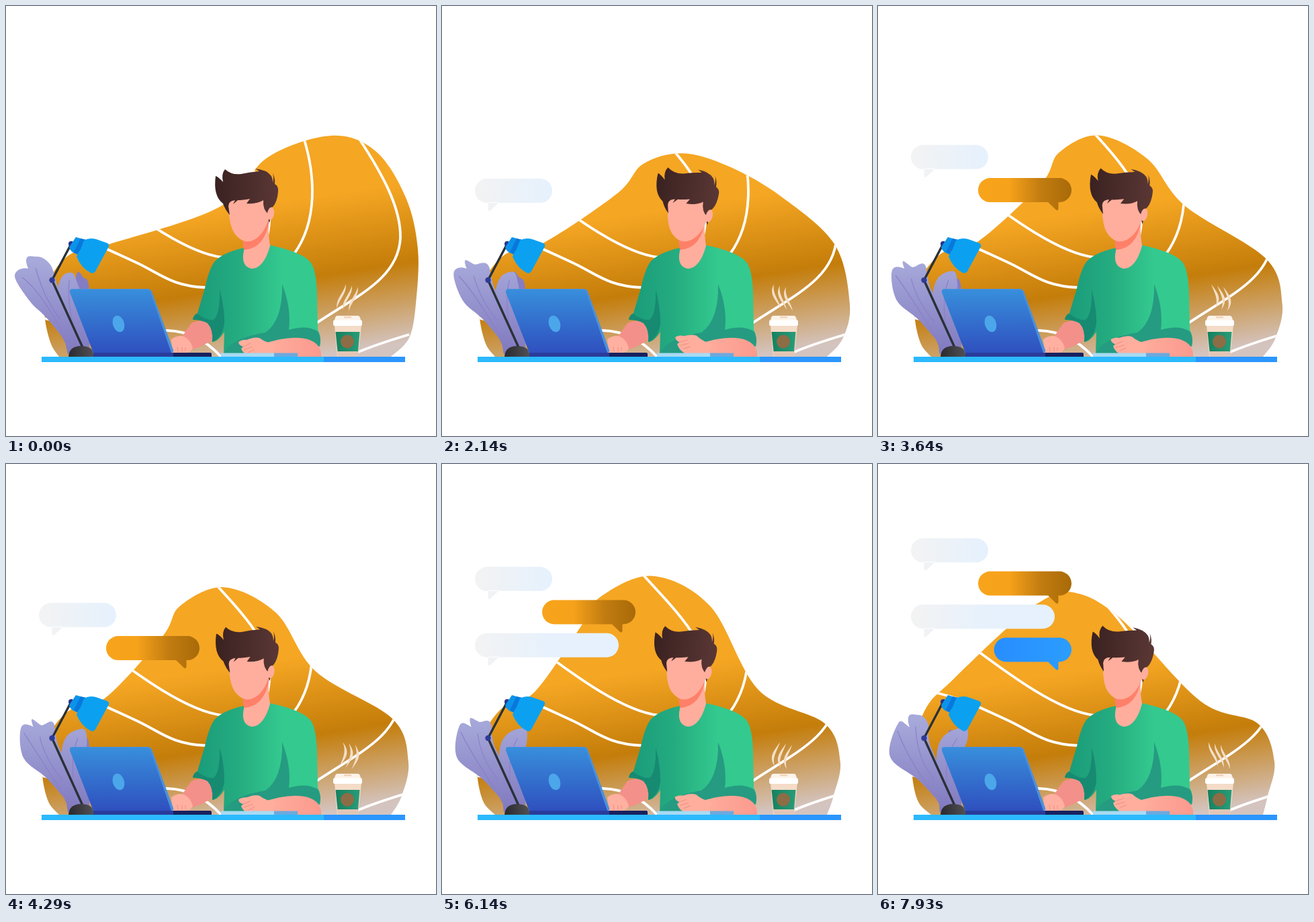
An HTML page with a canvas that plays this animation: 640 by 640 pixels, repeating every 8 s.

```html
<!DOCTYPE html>
<html lang="en">
<head>
<meta charset="utf-8">
<title>At the desk</title>
<style>
html, body { margin: 0; width: 100%; height: 100%; overflow: hidden; background: #fff; }
canvas { display: block; width: 100vw; height: 100vh; }
</style>
</head>
<body>
<canvas id="stage" width="640" height="640"></canvas>
<script>
const ctx = document.getElementById('stage').getContext('2d');
const LOOP = 8000, FPS = 14;

const mix = (a, b, k) => a + (b - a) * k;
const clamp = k => Math.min(1, Math.max(0, k));
const ease = k => { k = clamp(k); return k * k * (3 - 2 * k); };

// Curve through all points, closed by a straight edge
function spline(pts) {
  const path = new Path2D();
  path.moveTo(...pts[0]);
  for (let i = 0; i < pts.length - 1; i++) {
    const a = pts[Math.max(0, i - 1)], b = pts[i], c = pts[i + 1];
    const d = pts[Math.min(pts.length - 1, i + 2)];
    path.bezierCurveTo(b[0] + (c[0] - a[0]) / 6, b[1] + (c[1] - a[1]) / 6,
      c[0] - (d[0] - b[0]) / 6, c[1] - (d[1] - b[1]) / 6, c[0], c[1]);
  }
  path.closePath();
  return path;
}

function gradient(x0, y0, x1, y1, ...colors) {
  const g = ctx.createLinearGradient(x0, y0, x1, y1);
  colors.forEach((c, i) => g.addColorStop(i / (colors.length - 1), c));
  return g;
}

function fill(shape, color) {
  ctx.fillStyle = color;
  ctx.fill(typeof shape === 'string' ? new Path2D(shape) : shape);
}

function stroke(d, color, width) {
  ctx.strokeStyle = color;
  ctx.lineWidth = width;
  ctx.stroke(new Path2D(d));
}

function rect(x, y, w, h, color) {
  ctx.fillStyle = color;
  ctx.fillRect(x, y, w, h);
}

function ellipse(x, y, rx, ry, color, turn = 0) {
  ctx.beginPath();
  ctx.ellipse(x, y, rx, ry, turn, 0, Math.PI * 2);
  ctx.fillStyle = color;
  ctx.fill();
}

function turned(x, y, angle, draw) {
  ctx.save();
  ctx.translate(x, y);
  ctx.rotate(angle);
  ctx.translate(-x, -y);
  draw();
  ctx.restore();
}

// Backdrop: six key points along the crest, left to right, in each pose
const poses = [
  { at: 0, crest: [[318, 299], [390, 225], [484, 193], [550, 216], [595, 285], [613, 362]] },
  { at: 1000, crest: [[290, 280], [345, 246], [420, 222], [500, 237], [560, 273], [598, 352]] },
  { at: 2140, crest: [[258, 279], [295, 234], [352, 219], [420, 239], [500, 285], [583, 355]] },
  { at: 2930, crest: [[248, 268], [275, 221], [330, 197], [400, 230], [455, 292], [578, 374]] },
  { at: 5430, crest: [[210, 240], [236, 196], [317, 163], [405, 209], [470, 334], [570, 386]] },
  { at: 7930, crest: [[190, 246], [240, 206], [290, 191], [360, 229], [480, 353], [565, 386]] }
];
const hillLines = [
  'M443 196C460 250 465 320 428 370',
  'M290 155C330 198 355 225 370 248C390 275 398 310 388 345',
  'M526 198C560 250 588 300 587 345C584 405 525 430 462 472',
  'M600 489C570 498 545 506 522 516',
  'M80 339C130 350 150 362 190 380S245 417 298 419',
  'M140 272C200 317 270 368 322 374',
  'M50 463C110 480 160 482 240 483C275 484 300 500 320 522'
];

function crestAt(t) {
  const next = poses.find(p => p.at > t) || poses[poses.length - 1];
  const from = poses[poses.indexOf(next) - 1];
  const k = clamp((t - from.at) / (next.at - from.at)) ** 1.5;
  return from.crest.map(([x, y], i) => [mix(x, next.crest[i][0], k), mix(y, next.crest[i][1], k)]);
}

function drawHill(t) {
  const p = t / LOOP, left = 58 - 7 * p;
  const foot = [152 - 42 * p ** 4, 355 - 10 * p - 25 * p ** 4];
  const right = 600 + 10 * Math.cos(Math.PI * p);
  const path = spline([[79, 522], [left + 9, 503], [left, 465], [left + 1, 420],
    [foot[0] / 2 + 17, 368 + (foot[1] - 344) * .3], foot, ...crestAt(t),
    [right, 443], [right - 10, 494], [573, 522]]);
  fill(path, gradient(52.4, 345.6, 87.5, 577.7, '#f5a623', '#c47d0a', '#d4c4c0'));
  ctx.save();
  ctx.clip(path);
  hillLines.forEach(d => stroke(d, '#fff', 3.8));
  ctx.restore();
}

function drawPlant(t) {
  const p = t / LOOP, dip = 16 * Math.sin(Math.PI * p), vein = '#8b80c9';
  const lilac = gradient(0, 380, 0, 518, '#a7a9da', '#8079bf');
  fill(spline([[100, 518], [104, 405], [115, 404], [124, 422], [124, 518]]), '#857dc3');
  fill(spline([[90, 505], [32 + 14 * p, 388], [46 + 14 * p, 373 + dip], [66 + 8 * p, 385], [78, 420], [112, 518]]), lilac);
  fill(spline([[104, 518], [62, 466 + 6 * p], [36 - 18 * p, 440 - 4 * p], [13 + 17 * p, 402 - 16 * p],
    [34 + 12 * p, 391], [78, 420], [112, 518]]), lilac);
  stroke(`M100 515Q${54 - 8 * p} ${425 + 20 * p} ${24 + 5 * p} ${404 - 7 * p}`, vein, 1.3);
  stroke(`M84 470Q58 440 ${44 + 12 * p} ${390 + dip}`, vein, 1.2);
  fill(spline([[92, 518], [77 + 10 * p, 440], [82 + 16 * p, 405], [98 + 32 * p, 397 - 5 * p],
    [106 + 27 * p, 412], [118, 450], [124, 518]]), lilac);
  stroke(`M110 515Q90 450 ${94 + 24 * p} 408`, vein, 1.3);
}

function drawLamp() {
  ctx.lineJoin = 'round';
  stroke('M114 508L68.500 408L97 354', '#2a3138', 3.4);
  fill('M93 522Q94 507 110 506Q129 506 130 517V522Z', gradient(93, 0, 130, 0, '#2a2a2e', '#505055'));
  ellipse(68.5, 408, 4.2, 4.2, '#2f3b94');
  ellipse(97, 354, 4, 4, '#26368c');
  fill('M104 344L118 348L107 370Q96 367 94 359Z', '#0b93ea');
  fill('M111 346L120 348L109 371L101 366Z', '#0878dc');
  fill('M116 349Q124 344 134 347L151 353Q154 355 153 358L133 395Q130 399 126 397Q112 390 105 373Q107 367 111 362Z', '#0ba1f0');
}

// Man
const SKIN = '#ffae9d';

function drawBody() {
  fill('M276 472Q290 465 302 472Q311 484 306 497Q300 503 278 511L262 492Z', '#f4908a');
  fill('M354 360Q322 367 310 381Q302 392 296 420L285 457Q279 460 278 467Q291 467 300 472Q309 482 307 500Q315 500 325 485L324 517H440L467 506Q469 490 464 482L463 430Q462 392 453 381Q440 366 393 356Z',
    gradient(285, 0, 410, 0, '#1a9c7a', '#25ac80', '#34c98f'));
  fill('M318 422Q325 448 325 472Q322 494 307 500Q309 482 300 472Q291 467 278 467Q279 460 284 458Q300 469 309 467Q319 458 318 422Z', '#178a72');
  fill('M411 414Q412 468 386 486Q335 494 324 517H385Q420 485 467 507Q470 492 464 484Q447 474 421 482Q425 450 411 414Z', '#259b81');
  fill('M355 340L354 364Q349 388 366 391Q384 390 393 357Q390 340 391 318Z', SKIN);
  fill('M352 347L354 363Q386 361 392 318L378 320Z', '#ff8069');
}

function drawHead() {
  fill('M388 306L394 315L392 323Z', '#38211f');
  fill('M331 291Q331 330 343 342Q356 356 371 347Q385 338 391 316L395 300L385 285L340 283Z', SKIN);
  fill('M312 253Q317 255 323 262Q320 250 326 243Q336 252 350 250Q364 247 377 246L371 242Q388 244 394 252Q397 256 397 263Q399 256 397 249Q401 257 400 265Q406 268 405 276Q404 290 398 298Q392 302 391 310Q382 304 383 289Q374 295 358 294L363 287Q352 289 345 289L338 295L341 289Q331 290 331 298L333 311Q326 303 323 294Q308 283 312 253Z',
    gradient(312, 0, 405, 0, '#3a2221', '#5a3735'));
  ellipse(394, 309, 5, 9.5, SKIN, .15);
}

function drawHands(angle) {
  fill('M380 504Q425 488 452 497Q470 504 469 522H390Q375 516 380 504Z',
    gradient(385, 0, 469, 0, '#ffae9d', '#fb9a8e'));
  turned(402, 507, angle, () => {
    fill('M346 500Q352 496 358 497Q370 492 377 494Q388 502 402 503L396 523H364Q353 518 350 510L353 507Q346 505 346 500Z', SKIN);
    stroke('M353 507L364 502M354 512L367 507M360 516L370 511', '#f08f83', 1);
  });
  fill('M246 496Q256 489 265 492Q275 497 278 509Q275 516 268 516H248Z', '#ffb0a0');
  stroke('M256 515L255 507M262 515L262 508M267 513L267 508', '#f08f83', 1);
}

function drawLaptop() {
  rect(130, 516, 119, 6.5, '#2a3c9b');
  fill('M249 516H304Q306 516 306 518V522H249Z', '#18215f');
  fill('M99 421H211Q215 421 217 425L249 512Q250 516 246 516H130L95 426Q94 421 99 421Z', '#4a90dc');
  fill('M99 422H209Q213 422 215 426L246 516H130L95 426Q95 422 99 422Z',
    gradient(0, 421, 0, 516, '#388fdc', '#2f50bf'));
  ellipse(167.5, 473, 8.5, 12.5, '#4ba6ea', -.3);
}

function drawDesk() {
  rect(320, 516.5, 79, 6, '#a8daf3');
  rect(399, 516.5, 35, 6, '#6ca9de');
  rect(53, 522, 420, 8, '#2bb9ff');
  rect(473, 522, 121, 8, '#2a96ff');
}

function drawCup(t) {
  fill('M489 475H529L524 522H493Z', '#f4dcc8');
  fill('M493 514H525L524 522H494Z', '#e2c6b6');
  fill('M490.500 485H526.500L524 514H493.500Z', gradient(490, 0, 527, 0, '#15805f', '#2a9c78'));
  ellipse(508, 499.5, 10, 10, '#8d6d45');
  fill('M493 461H524Q527 461 528 468H489Q490 461 493 461Z', '#fdf3ea');
  rect(503, 462, 11, 2.5, '#f2d3ba');
  fill('M488 467.500H529Q530 468 530 470V474Q530 476 528 476H489Q487 476 487 474V470Q487 468 488 467.500Z', '#fff');

  // Steam: tapered ribbons along a travelling wave
  const phase = t / 5300 * Math.PI * 2;
  for (let n = 0; n < 3; n++) {
    const near = [], far = [];
    for (let i = 0; i <= 8; i++) {
      const v = i / 8, w = 2 * Math.sin(Math.PI * v);
      const x = 499 + 9 * n + 6.5 * Math.cos(Math.PI * v + phase), y = 414 + 2 * n + 36 * v;
      near.push([x - w, y]);
      far.unshift([x + w, y]);
    }
    fill(spline([...near, ...far]), '#f5dfc9');
  }
}

// Chat: each new bubble pushes the stack up, then eases it a little further
const PUSH = 40.2, GAP = 49.3;
const bubbles = [
  { rise: 9, width: 115, colors: ['#f3f3f3', '#e5f1fd'] },
  { rise: 10, width: 139, right: true, colors: ['#f8a41b', '#f6a21a', '#c27c10', '#a86a08'] },
  { rise: 13.5, width: 214, colors: ['#f3f3f3', '#e7f1fc', '#e5f1fd'] },
  { rise: 11, width: 172, right: true, colors: ['#2686ff', '#2b9dff'] }
].map((b, i) => ({ ...b, start: 190 + 2500 * i }));

function drawChat(t) {
  let top = 266;
  bubbles.forEach((b, i) => {
    top -= b.rise * ease((t - b.start) / 800);
    if (i) top -= PUSH * ease((t - b.start + 500) / 500);
  });
  bubbles.forEach((b, i) => {
    const age = t - b.start;
    if (age <= 0) return;
    const w = Math.max(36, b.width * (1 - (1 - clamp(age / 560)) ** 2));
    const y = top + GAP * i, x = b.right ? 288 - w : 49;
    const x0 = b.right ? 288 - b.width : 49;
    const path = new Path2D();
    path.roundRect(x, y, w, 36, 18);
    path.addPath(new Path2D(b.right
      ? `M252 ${y + 35}H268.500V${y + 46}Q268 ${y + 49} 265 ${y + 47.5}Z`
      : `M85 ${y + 35}H68.500V${y + 46}Q69 ${y + 49} 72 ${y + 47.5}Z`));
    ctx.globalAlpha = clamp(age / 100);
    fill(path, gradient(x0, 0, x0 + b.width, 0, ...b.colors));
    ctx.globalAlpha = 1;
  });
}

function draw(t) {
  const nod = .05 * (1 - Math.cos(t / 4780 * Math.PI * 2));
  rect(0, 0, 640, 640, '#fff');
  drawHill(t);
  drawPlant(t);
  drawLamp();
  drawBody();
  turned(360, 350, nod, drawHead);
  drawHands(nod * 1.4);
  drawLaptop();
  drawCup(t);
  drawDesk();
  drawChat(t);
}

function tick() {
  const t = performance.now() % LOOP;
  draw(Math.floor(t * FPS / 1000) * 1000 / FPS);
  requestAnimationFrame(tick);
}
tick();
</script>
</body>
</html>
```
